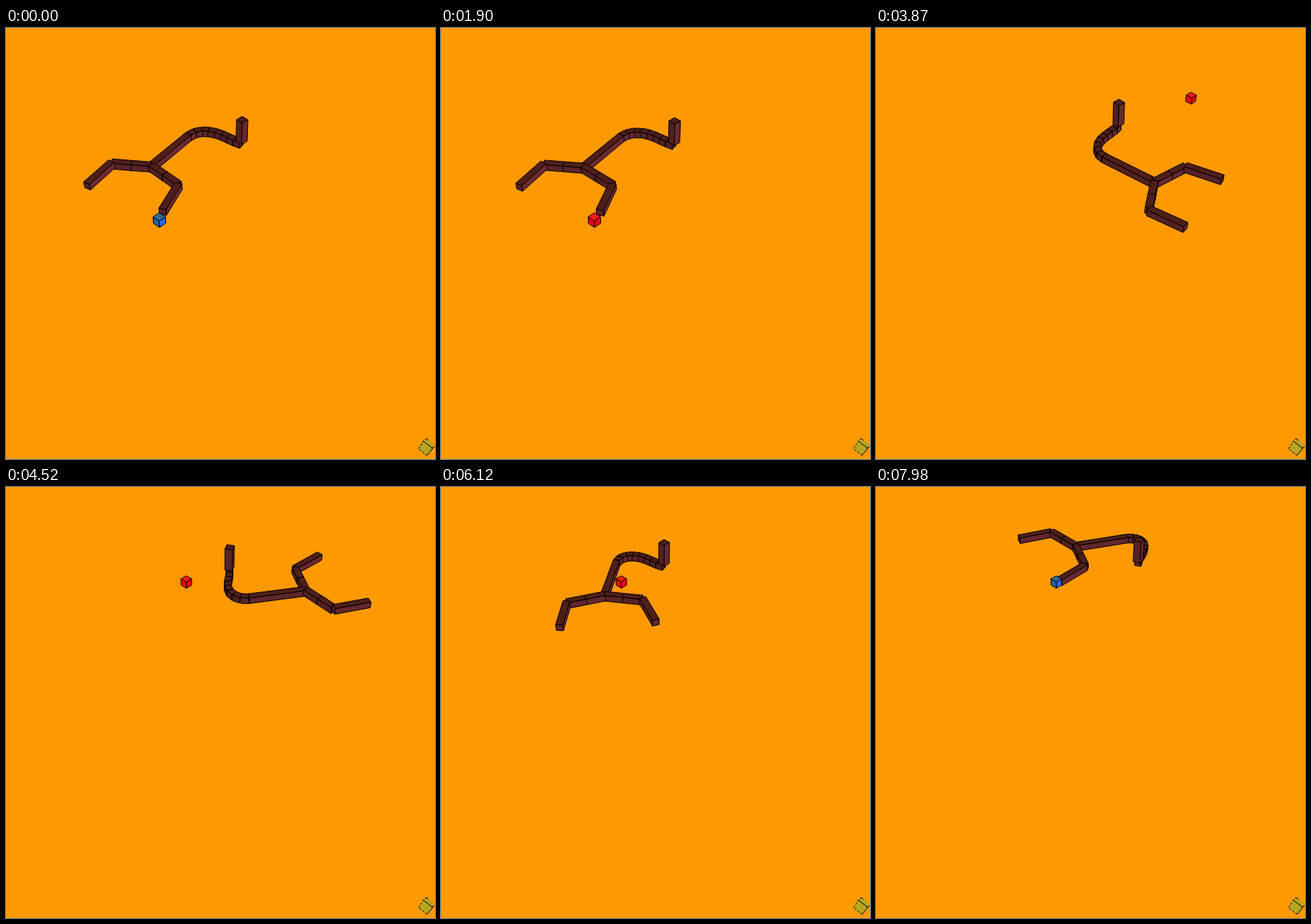
An HTML page for the animation above (8000 ms loop, 587 by 590 pixels).

```html
<!DOCTYPE html>
<html lang="en">
<head>
<meta charset="utf-8">
<title>Jointed claw</title>
<style>
html, body { margin: 0; width: 100%; height: 100%; overflow: hidden; background: #f90; }
svg { display: block; width: 587px; height: 590px; }
polygon, path { stroke: #000; stroke-width: 1; stroke-linejoin: round; }
</style>
</head>
<body>
<svg viewBox="0 0 587 590">
  <rect width="587" height="590" fill="#f90"/>
  <g id="corner">
    <polygon points="564,576 571,565 575,562 586.5,570.5 584,577 575,585" fill="#b8a51e" style="stroke:none"/>
    <path d="M571 565.5 584 575.5 576 585M582.5 575.5 586.5 573M575 562 578 564.5" fill="none"/>
    <path d="M576 585 564.5 576 571 565.5 575 562" fill="none" stroke-dasharray="3 2"/>
  </g>
  <g id="scene"></g>
</svg>
<script>
const LOOP = 8000;
const BEAM = 11, LINKS = 8, LINK = 12.2, BODY = 95, UPPER = 62, LOWER = 60.5;
const BLOCK = 12.3, HOLD = 65;
const rad = d => d * Math.PI / 180;
const scene = document.getElementById('scene');

// path of the post on the ground
const PATH = [
  { t: 1070, x: 34, y: -224 },
  { t: 1900, x: 30, y: -221 },
  { t: 2500, x: 65, y: -257 },
  { t: 3150, x: 57, y: -256 },
  { t: 3870, x: 46, y: -271 },
  { t: 4320, x: 14, y: -303 },
  { t: 5080, x: 20, y: -336 },
  { t: 6890, x: 11, y: -318 },
  { t: 7980, x: 81, y: -334 }
];
// where the block lies, and until when
const BLOCKS = [
  { until: 2960, x: -85.8, y: -46.8 },
  { until: 4450, x: 172.7, y: -352 },
  { until: LOOP, x: -55.5, y: -280 }
];

const ramp = (t, a, b) => Math.min(1, Math.max(0, (t - a) / (b - a)));
const bump = (t, a, b) => Math.sin(Math.PI * ramp(t, a, b));

function postAt(t) {
  const i = Math.max(1, PATH.findIndex(p => p.t > t));
  const last = t >= PATH[PATH.length - 1].t ? PATH.length - 1 : i;
  const a = PATH[last - 1], b = PATH[last], k = ramp(t, a.t, b.t);
  return [a.x + (b.x - a.x) * k, a.y + (b.y - a.y) * k];
}

const headingAt = t => 125 + 9 * bump(t, 1070, 1900)
  - 137 * ramp(t, 3150, 4300) + 104 * ramp(t, 5110, 5965) + 72 * ramp(t, 5965, 7440);

const bendAt = t => 93 - 22 * ramp(t, 1900, 2500)
  + 47 * ramp(t, 3150, 4800) + 10 * ramp(t, 6890, 7980);

const gripAt = t => .25 + .25 * ramp(t, 1070, 1900) - .5 * ramp(t, 1900, 2500)
  + .5 * bump(t, 2730, 3150) + ramp(t, 3870, 4450);

// share of the bend reached by each link
const curl = i => Math.sin(2.1 * (i + .5) / LINKS);

// camera pitched 45 degrees; y points to the viewer, z up
function project([x, y, z]) {
  const c = Math.SQRT1_2, s = 1 / (1 - .00101 * c * (y + z));
  return [293 + x * s, 295 + (y - z) * c * s];
}

const mix = (a, b, k) => `rgb(${a.map((v, i) => Math.round(v + (b[i] - v) * k))})`;
const wood = (nx, top) => top ? '#4f1f19' : mix([76, 31, 31], [110, 43, 53], (nx + 1) / 2);
const red = (nx, top) => top ? '#ff1a14' : nx > 0 ? '#fa0010' : '#ff0008';
const blue = (nx, top) => top ? '#2e6b98' : nx > 0 ? '#2469f5' : '#2a62a2';

function box(x, y, angle, len, wide, z0, z1, paint) {
  const c = Math.cos(angle), s = Math.sin(angle);
  const rim = [[-1, -1], [1, -1], [1, 1], [-1, 1]].map(([u, v]) => {
    const a = u * len / 2, b = v * wide / 2;
    return [x + a * c - b * s, y + a * s + b * c];
  });
  const low = rim.map(p => project([...p, z0])), high = rim.map(p => project([...p, z1]));
  const normals = [s, c, -s, -c];
  const face = (pts, fill) =>
    `<polygon fill="${fill}" points="${pts.map(p => p.map(v => v.toFixed(1))).join(' ')}"/>`;
  let svg = '';
  for (let i = 0; i < 4; i++) {
    const j = (i + 1) % 4, [p, q, r] = [high[i], high[j], low[j]];
    const turn = (q[0] - p[0]) * (r[1] - q[1]) - (q[1] - p[1]) * (r[0] - q[0]);
    if (turn < 0) svg += face([p, q, r, low[i]], paint(normals[i], false));
  }
  svg += face(high, paint(0, true));
  return { near: y + (z0 + z1) / 2, svg };
}

function draw(t) {
  const post = postAt(t), heading = headingAt(t), bend = bendAt(t), grip = gripAt(t);
  const parts = [];
  // adds a beam from a point and returns its far end
  const beam = ([x, y], deg, len) => {
    const a = rad(deg), dx = Math.cos(a) * len, dy = Math.sin(a) * len;
    parts.push(box(x + dx / 2, y + dy / 2, a, len, BEAM, -BEAM / 2, BEAM / 2, wood));
    return [x + dx, y + dy];
  };
  const arm = (from, upper, lower) => {
    const mid = beam(from, heading + upper, UPPER / 2);
    beam(beam(mid, heading + upper, UPPER / 2), heading + lower, LOWER);
  };

  let p = post;
  for (let i = LINKS - 1; i >= 0; i--) p = beam(p, heading + bend * curl(i), LINK);
  p = beam(p, heading, BODY);
  arm(p, 62, -4);
  arm(p, -76 - 14 * grip, -10 - 20 * grip);
  parts.push(box(...post, rad(heading + bend * curl(LINKS - 1) + 15), 12.5, 12.5, 5, 46, wood));

  const block = BLOCKS.find(b => t < b.until);
  const held = t < 1100 || t > block.until - HOLD;
  parts.push(box(block.x, block.y, rad(43), BLOCK, BLOCK, -BLOCK / 2, BLOCK / 2, held ? blue : red));

  parts.sort((a, b) => a.near - b.near);
  scene.innerHTML = parts.map(b => b.svg).join('');
}

const start = performance.now();
function tick() {
  draw((performance.now() - start) % LOOP);
  requestAnimationFrame(tick);
}
tick();
</script>
</body>
</html>
```
